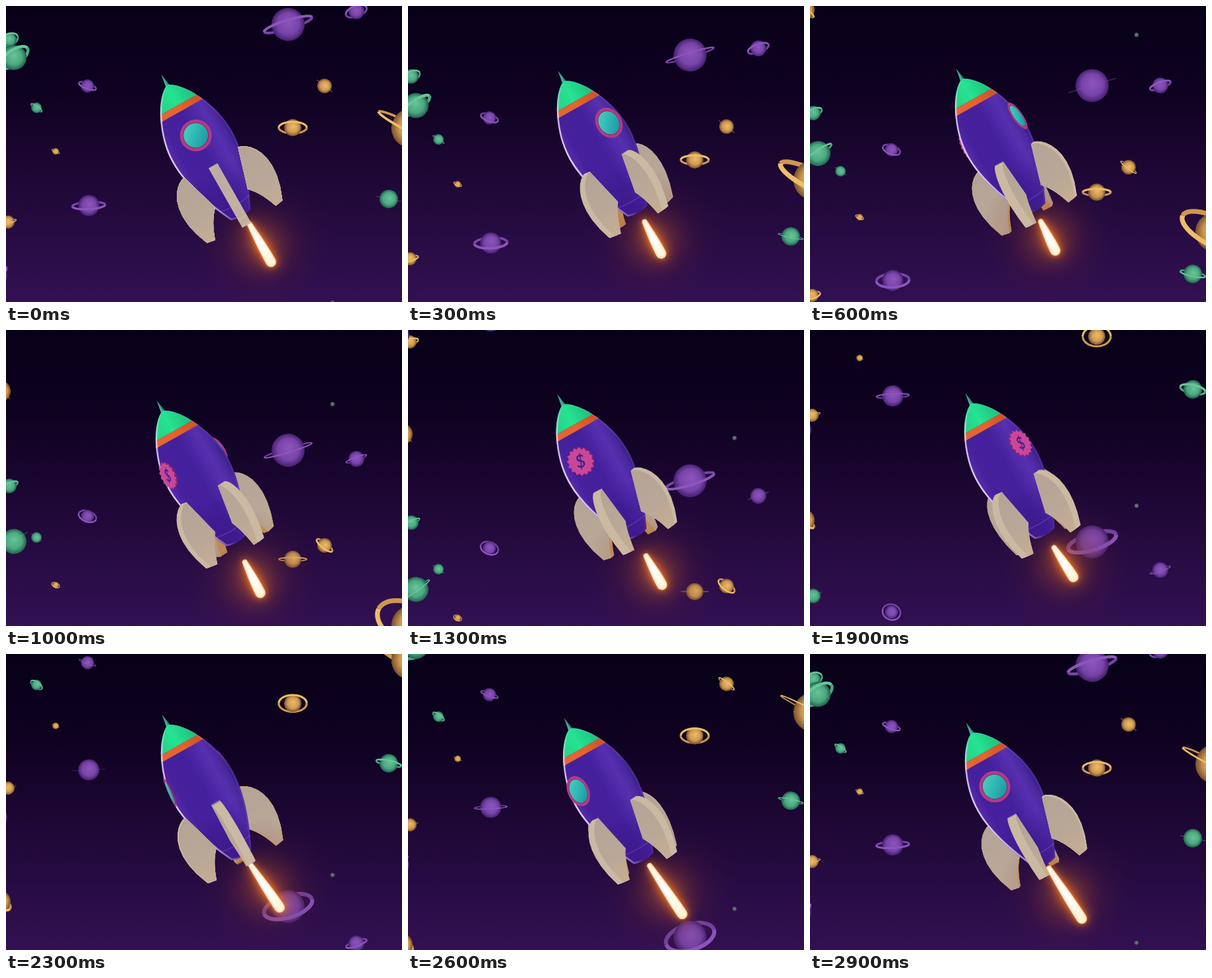
An HTML page with a canvas for the animation above (3 s loop, 598x448 px).

```html
<!DOCTYPE html>
<html lang="en">
<head>
<meta charset="utf-8">
<title>Rocket among planets</title>
<style>
html, body { margin: 0; width: 100%; height: 100%; overflow: hidden; background: #0a0018; }
canvas { display: block; width: 598px; height: 448px; }
</style>
</head>
<body>
<canvas id="stage" width="598" height="448"></canvas>
<script>
const W = 598, H = 448, STEPS = 30, STEP_MS = 100;
const ctx = document.getElementById('stage').getContext('2d');
const TAU = Math.PI * 2, rad = d => d * Math.PI / 180;

const PURPLE = ['#8e55bd', '#7844a8', '#452070'];
const GREEN = ['#68c598', '#4ba880', '#23604f'];
const GOLD = ['#edbd69', '#cf9850', '#76502f'];

// x, start y, pixels per step, radius, colours, ring radius, ring tilt, height where the ring is edge-on
const planets = [
  [426, 28, 15.4, 25, PURPLE, 41, -17, 130],
  [529, 8, 18.7, 12, PURPLE, 18, -20, 290],
  [5, 51, 18.5, 11, GREEN, 15, -25, 420],
  [12, 78, 24.2, 19, GREEN, 27, -35, 330],
  [46, 154, 16, 8, GREEN, 11, 35, 300],
  [123, 121, 16.1, 10, PURPLE, 15, 20, -60],
  [75, 220, 16.6, 5, GOLD, 7, 25, 60],
  [125, 302, 18.9, 16, PURPLE, 27, -3, 175],
  [3, 327, 18.5, 10, GOLD, 14, -15, 220],
  [-16, 408, 24, 18, PURPLE, 22, -40, 200],
  [-10, 520, 21.7, 17, GOLD, 21, 35, 120],
  [481, 121, 20.5, 11, GOLD, 16, 38, 150],
  [433, 184, 16.3, 13, GOLD, 23, 0, 420],
  [578, 292, 18.9, 14, GREEN, 21, 12, 290],
  [612, 185, 26.2, 30, GOLD, 60, 27, 120],
  [493, 449, 17.1, 3.5, ['#6f8277', '#53635f', '#302f43'], 0, 0, 0]
];

const keySteps = [0, 6, 10, 15, 19, 23, 29];
const sway = {
  x: [242, 228, 235, 232, 242, 243, 243],
  y: [120, 111, 123, 107, 112, 108, 120],
  fireTop: [243, 245, 259, 258, 250, 245, 234],
  fireEnd: [318, 303, 320, 316, 312, 331, 334],
  fireTopX: [6, -1, -3, -1, 3, 6, 2],
  fireEndX: [6, -4, -6, 0, 7, 13, 8]
};

// Smooth closed curve through the keys.
function track(values, s) {
  const n = keySteps.length;
  const time = i => keySteps[(i + n) % n] + STEPS * Math.floor(i / n);
  const val = i => values[(i + n) % n];
  const slope = i => (val(i + 1) - val(i - 1)) / (time(i + 1) - time(i - 1));
  let i = n - 1;
  while (keySteps[i] > s) i--;
  const d = time(i + 1) - time(i), u = (s - time(i)) / d, v = 1 - u;
  return val(i) * v * v * (1 + 2 * u) + val(i + 1) * u * u * (3 - 2 * u)
    + d * u * v * (slope(i) * v - slope(i + 1) * u);
}

function linear(x0, y0, x1, y1, stops) {
  const g = ctx.createLinearGradient(x0, y0, x1, y1);
  stops.forEach(([at, c]) => g.addColorStop(at, c));
  return g;
}

function radial(x, y, r, stops, fx = x, fy = y) {
  const g = ctx.createRadialGradient(fx, fy, 0, x, y, r);
  stops.forEach(([at, c]) => g.addColorStop(at, c));
  return g;
}

function disc(x, y, rx, ry, fill) {
  ctx.beginPath();
  ctx.ellipse(x, y, rx, ry, 0, 0, TAU);
  ctx.fillStyle = fill;
  ctx.fill();
}

function drawSky() {
  ctx.fillStyle = linear(0, 0, 0, H, [[0, '#080018'], [.3, '#0f0221'], [.6, '#1f0837'], [1, '#321052']]);
  ctx.fillRect(0, 0, W, H);
}

function drawPlanet(x, y, r, colors, ringR, tilt, eye) {
  if (y < -70 || y > H + 70) return;
  const open = ringR * (y - eye) * .0016;
  const half = front => {
    if (!ringR) return;
    ctx.beginPath();
    for (let i = 0; i <= 24; i++) {
      const a = Math.PI * (i / 24 + (front ? 0 : 1));
      ctx.lineTo(ringR * .92 * Math.cos(a), open * Math.sin(a));
    }
    ctx.strokeStyle = colors[front ? 0 : 1];
    ctx.lineWidth = Math.max(.8, Math.min(r * .24, Math.abs(open) * .6));
    ctx.globalAlpha = Math.min(1, .25 + Math.abs(open) / 3);
    ctx.stroke();
    ctx.globalAlpha = 1;
  };
  ctx.save();
  ctx.translate(x, y);
  ctx.rotate(rad(tilt));
  half(false);
  disc(0, 0, r, r, radial(0, 0, r, [[0, colors[0]], [.65, colors[1]], [1, colors[2]]], r * .1, -r * .15));
  half(true);
  ctx.restore();
}

function drawPlanets(s) {
  ctx.filter = 'blur(0.7px)';
  for (const [x, y0, v, ...look] of planets) {
    const span = v * 29.7, y = (y0 + v * s) % span;
    drawPlanet(x, y, ...look);
    drawPlanet(x, y - span, ...look);
  }
  ctx.filter = 'none';
}

function bodyPath() {
  ctx.beginPath();
  ctx.moveTo(0, 0);
  ctx.bezierCurveTo(22, 8, 51, 60, 51, 108);
  ctx.bezierCurveTo(51, 150, 32, 195, 17, 226);
  ctx.quadraticCurveTo(0, 232, -17, 226);
  ctx.bezierCurveTo(-32, 195, -51, 150, -51, 108);
  ctx.bezierCurveTo(-51, 60, -22, 8, 0, 0);
  ctx.closePath();
}

function drawBody() {
  ctx.beginPath();
  ctx.moveTo(0, -18);
  ctx.lineTo(3.5, 3);
  ctx.lineTo(-3.5, 3);
  ctx.fillStyle = linear(-3, 0, 3, 0, [[0, '#62c7b2'], [1, '#187665']]);
  ctx.fill();

  ctx.save();
  bodyPath();
  ctx.clip();
  ctx.fillStyle = linear(-51, 0, 51, 0,
    [[0, '#5a2cad'], [.15, '#47209c'], [.5, '#44209d'], [.78, '#5730b0'], [.92, '#4a279d'], [1, '#35197c']]);
  ctx.fillRect(-60, 0, 120, 235);
  ctx.fillStyle = linear(0, 150, 0, 230, [[0, 'rgba(40,12,110,0)'], [1, 'rgba(60,20,130,.6)']]);
  ctx.fillRect(-60, 150, 120, 85);
  ctx.fillStyle = linear(-30, 0, 34, 0, [[0, '#29cf84'], [.45, '#25e392'], [1, '#1cbc78']]);
  ctx.fillRect(-60, -2, 120, 37);
  ctx.fillStyle = linear(-38, 0, 38, 0, [[0, '#dd683c'], [.5, '#e8632c'], [1, '#c75228']]);
  ctx.fillRect(-60, 35, 120, 10);
  ctx.strokeStyle = 'rgba(120,75,200,.5)';
  ctx.lineWidth = 1.5;
  ctx.beginPath();
  ctx.moveTo(-30, 206);
  ctx.quadraticCurveTo(0, 213, 30, 206);
  ctx.stroke();
  bodyPath();
  ctx.lineWidth = 5;
  ctx.strokeStyle = linear(-51, 0, 51, 0,
    [[0, '#f3e9ff'], [.2, 'rgba(240,225,255,.8)'], [.5, 'rgba(220,200,255,0)'], [1, 'rgba(140,100,220,.25)']]);
  ctx.globalAlpha = .85;
  ctx.stroke();
  ctx.restore();
}

// Outline of a fin as radius and distance along the axis.
function finOutline() {
  const curve = (a, b, c, d) => Array.from({ length: 11 }, (_, i) => {
    const u = i / 10, v = 1 - u;
    return [0, 1].map(k => a[k] * v ** 3 + 3 * b[k] * v * v * u + 3 * c[k] * v * u * u + d[k] * u ** 3);
  });
  return [...curve([47, 136], [62, 138], [95, 168], [65, 237]), [53, 239],
    ...curve([53, 239], [47, 222], [40, 208], [29, 197])];
}
const fin = finOutline();

function drawFin(angle) {
  const sin = Math.sin(angle), cos = Math.cos(angle);
  const near = sin > 0 ? -7 : 7;
  const trace = (off, color) => {
    ctx.beginPath();
    for (const [r, a] of fin) ctx.lineTo(r * sin + off * cos, a + .1 * (r * cos - off * sin));
    ctx.closePath();
    ctx.fillStyle = ctx.strokeStyle = color;
    ctx.lineWidth = 1.2;
    ctx.fill();
    ctx.stroke();
  };
  const edge = cos < -.1 ? '#cf9a58' : '#cbb9a3';
  for (let i = 0; i <= 14; i++) trace(near * (i / 7 - 1), edge);
  if (Math.abs(sin) > .08) {
    trace(near, linear(0, 140, 0, 240, [[0, '#b5a397'], [.6, '#b9a797'], [1, '#c5ad92']]));
  }
}

function drawWindow() {
  disc(0, 0, 24, 24, '#b43b83');
  disc(0, 0, 19.5, 19.5, '#792b77');
  disc(0, 0, 18.5, 18.5, linear(-12, -14, 12, 14, [[0, '#45cbbd'], [.5, '#2eb6b2'], [1, '#2397a4']]));
}

function drawBadge() {
  ctx.beginPath();
  for (let i = 0; i < 32; i++) {
    const r = i % 2 ? 18.5 : 22.5, a = i * TAU / 32;
    ctx.lineTo(r * Math.cos(a), r * Math.sin(a));
  }
  ctx.closePath();
  ctx.fillStyle = '#ca4797';
  ctx.fill();
  ctx.rotate(rad(17));
  ctx.fillStyle = '#41208f';
  ctx.font = '600 27px Lato, sans-serif';
  ctx.textAlign = 'center';
  ctx.textBaseline = 'middle';
  ctx.fillText('$', 0, 1);
}

function drawDecal(angle, paint) {
  const cos = Math.cos(angle), sin = Math.sin(angle);
  const squash = Math.max(.1, Math.abs(cos));
  ctx.save();
  ctx.translate(48 * sin, 91 - 3 * cos);
  ctx.rotate(-.1 * sin);
  // A dark copy behind gives the raised rim.
  ctx.save();
  ctx.translate(-2.5 * sin, 0);
  ctx.scale(squash, 1);
  disc(0, 0, 21, 21, '#84256f');
  ctx.restore();
  ctx.scale(squash, 1);
  paint();
  ctx.restore();
}

function drawFire(s) {
  const [y0, y1, x0, x1] = ['fireTop', 'fireEnd', 'fireTopX', 'fireEndX'].map(k => track(sway[k], s));
  const midY = (y0 + y1) / 2, midX = (x0 + x1) / 2;
  ctx.fillStyle = radial(midX, midY, 105,
    [[0, 'rgba(215,105,45,.55)'], [.3, 'rgba(155,65,45,.36)'], [.6, 'rgba(95,35,55,.16)'], [1, 'rgba(70,20,60,0)']]);
  ctx.fillRect(midX - 105, midY - 105, 210, 210);

  ctx.save();
  ctx.translate(x0, y0);
  ctx.rotate(-Math.atan2(x1 - x0, y1 - y0));
  const len = Math.hypot(x1 - x0, y1 - y0);
  ctx.beginPath();
  ctx.moveTo(-3, 0);
  ctx.quadraticCurveTo(0, -3, 3, 0);
  ctx.bezierCurveTo(5, len * .3, 7, len * .6, 7, len - 8);
  ctx.bezierCurveTo(7, len + 2, -7, len + 2, -7, len - 8);
  ctx.bezierCurveTo(-7, len * .6, -5, len * .3, -3, 0);
  ctx.shadowColor = '#ff7a1c';
  ctx.shadowBlur = 20;
  ctx.fillStyle = '#ffb864';
  ctx.fill();
  ctx.shadowBlur = 9;
  ctx.fill();
  ctx.shadowBlur = 0;
  ctx.strokeStyle = '#ffc47a';
  ctx.lineWidth = 1.5;
  ctx.stroke();
  ctx.filter = 'blur(1px)';
  ctx.scale(.76, .97);
  ctx.fillStyle = linear(0, 0, 0, len, [[0, '#fff3df'], [.5, '#ffffff'], [1, '#fff2d5']]);
  ctx.fill();
  ctx.restore();
}

function drawRocket(s) {
  const spin = s / STEPS * TAU;
  const fins = [0, 1, 2, 3].map(i => spin + i * TAU / 4).sort((a, b) => Math.cos(a) - Math.cos(b));
  const decals = [[spin, drawWindow], [spin + Math.PI, drawBadge]];
  const isFront = a => Math.cos(a) > -1e-6;

  ctx.save();
  ctx.translate(track(sway.x, s), track(sway.y, s));
  ctx.rotate(rad(-29.5));
  ctx.save();
  ctx.translate(1.5, 0);
  for (const a of fins) if (!isFront(a)) drawFin(a);
  ctx.restore();
  drawFire(s);
  ctx.translate(1.5, 0);
  for (const [a, paint] of decals) if (!isFront(a) && Math.cos(a) > -.6) drawDecal(a, paint);
  drawBody();
  for (const [a, paint] of decals) if (isFront(a)) drawDecal(a, paint);
  for (const a of fins) if (isFront(a)) drawFin(a);
  ctx.restore();
}

function render(now) {
  const s = Math.floor(now / STEP_MS) % STEPS;
  drawSky();
  drawPlanets(s);
  drawRocket(s);
}

const start = performance.now();
function tick() {
  render(performance.now() - start);
  requestAnimationFrame(tick);
}
tick();
</script>
</body>
</html>
```
